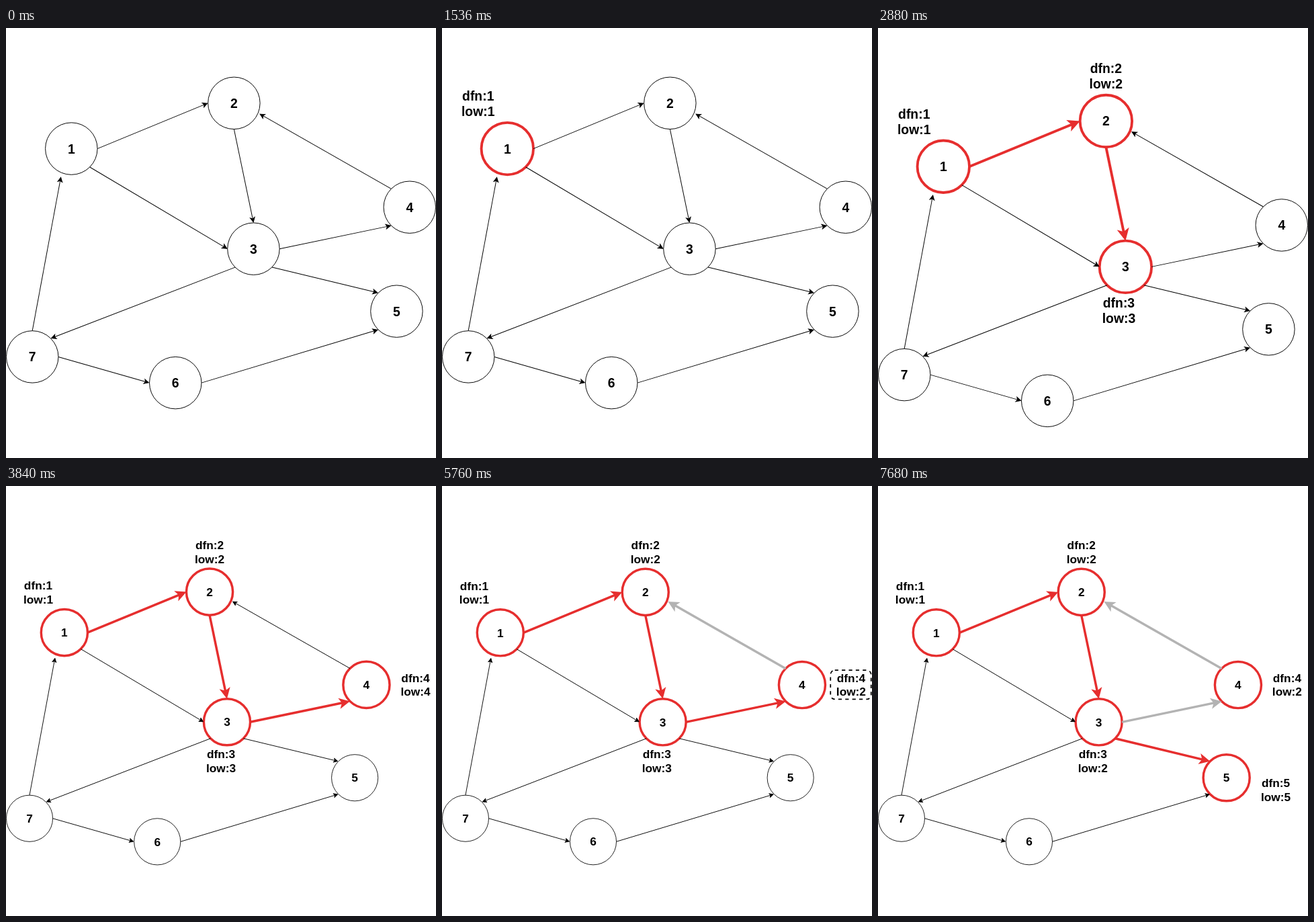
Animation of 640 by 640 pixels, one loop 8000 ms. Source, as an HTML page with a canvas:

```html
<!DOCTYPE html>
<html lang="en">
<head>
<meta charset="utf-8">
<title>Depth-first search with low links</title>
<style>
  html, body { margin: 0; width: 100%; height: 100%; overflow: hidden; background: #fff; }
  canvas { display: block; width: 100vw; height: 100vh; }
</style>
</head>
<body>
<canvas id="stage" width="640" height="640"></canvas>
<script>
const ctx = document.getElementById('stage').getContext('2d');
const LOOP = 8000, STEP = 960, R = 40;
const RED = '#e62e2e', GREY = '#b3b3b3', BLACK = '#000';
const D = R * Math.SQRT1_2;

// found: step at which the search reaches the node; tag: centre of its label
const nodes = {
  1: { x: 100, y: 110, found: 1, tag: [55, 41] },
  2: { x: 350, y: 40, found: 2, tag: [350, -29] },
  3: { x: 380, y: 264, found: 3, tag: [369.7, 331.3] },
  4: { x: 620, y: 200, found: 4, tag: [704.5, 199.7] },
  5: { x: 600, y: 360, found: 8, tag: [685, 380.5] },
  6: { x: 260, y: 470, found: 99 },
  7: { x: 40, y: 430, found: 99 }
};

// from, offset, to, offset, step it turns red, step it turns grey
const edges = [
  [1, [R, 0], 2, [-R, 0], 2],
  [1, [D, D], 3, [-R, 0]],
  [2, [0, R], 3, [0, -R], 3],
  [3, [R, 0], 4, [-D, D], 4, 7],
  [4, [-D, -D], 2, [39, 16.3], 5, 6],
  [3, [D, D], 5, [-D, -D], 8],
  [3, [-D, D], 7, [D, -D]],
  [7, [0, -R], 1, [-16, 43]],
  [7, [R, 0], 6, [-R, 0]],
  [6, [R, 0], 5, [-D, D]]
];

// first step, scale, top margin
const views = [
  [0, 640 / 661, 72.6],
  [2, 640 / 661, 99.3],
  [4, 0.8645, 122.6],
  [6, 0.8637, 122.9]
];

function text(str, x, y) {
  ctx.fillStyle = BLACK;
  ctx.fillText(str, x, y + 7.2);
}

function pen(color, width) {
  ctx.strokeStyle = ctx.fillStyle = color;
  ctx.lineWidth = width;
}

function drawNode(id, step) {
  const n = nodes[id], active = step >= n.found;
  ctx.beginPath();
  ctx.arc(n.x, n.y, R, 0, 2 * Math.PI);
  ctx.fillStyle = '#fff';
  ctx.fill();
  pen(active ? RED : BLACK, active ? 4 : 1);
  if (id == 2 && step === 5) {
    ctx.setLineDash([12, 2 * Math.PI * R / 12 - 12]);
    ctx.lineDashOffset = 6;
  }
  ctx.stroke();
  ctx.setLineDash([]);
  ctx.lineDashOffset = 0;
  text(id, n.x, n.y);
}

function drawEdge([from, a, to, b, red = 99, grey = 99], step) {
  const x0 = nodes[from].x + a[0], y0 = nodes[from].y + a[1];
  const x1 = nodes[to].x + b[0], y1 = nodes[to].y + b[1];
  const w = step >= red ? 4 : 1, size = 6 + w;
  const tip = Math.hypot(x1 - x0, y1 - y0) - w * 1.118;

  pen(step >= grey ? GREY : step >= red ? RED : BLACK, w);
  ctx.save();
  ctx.translate(x0, y0);
  ctx.rotate(Math.atan2(y1 - y0, x1 - x0));
  ctx.beginPath();
  ctx.moveTo(0, 0);
  ctx.lineTo(tip - size * 0.75, 0);
  ctx.stroke();
  ctx.beginPath();
  ctx.moveTo(tip, 0);
  ctx.lineTo(tip - size, size / 2);
  ctx.lineTo(tip - size * 0.75, 0);
  ctx.lineTo(tip - size, -size / 2);
  ctx.closePath();
  ctx.fill();
  ctx.stroke();
  ctx.restore();
}

function drawTag(id, step) {
  const n = nodes[id];
  if (step < n.found) return;
  const [x, y] = n.tag;
  const lowered = (id == 4 && step >= 6) || (id == 3 && step >= 7);
  text('dfn:' + id, x, y - 12);
  text('low:' + (lowered ? 2 : id), x, y + 12);
  if ((id == 4 && step === 6) || (id == 3 && step === 7)) {
    pen(BLACK, 2);
    ctx.setLineDash([6, 6]);
    ctx.beginPath();
    ctx.roundRect(x - 35.5, y - 25, 70, 50, 7.5);
    ctx.stroke();
    ctx.setLineDash([]);
  }
}

function draw(now) {
  const step = Math.floor((now % LOOP) / STEP);
  const [, scale, top] = views.filter(v => v[0] <= step).pop();
  ctx.setTransform(1, 0, 0, 1, 0, 0);
  ctx.fillStyle = '#fff';
  ctx.fillRect(0, 0, 640, 640);
  ctx.setTransform(scale, 0, 0, scale, scale / 2, top + scale / 2);
  ctx.font = 'bold 20px "Liberation Sans", Arial, sans-serif';
  ctx.textAlign = 'center';

  const ids = Object.keys(nodes);
  ids.forEach(id => drawNode(id, step));
  edges.forEach(e => drawEdge(e, step));
  ids.forEach(id => drawTag(id, step));
}

const start = performance.now();
function tick() {
  draw(performance.now() - start);
  requestAnimationFrame(tick);
}
tick();
</script>
</body>
</html>
```
